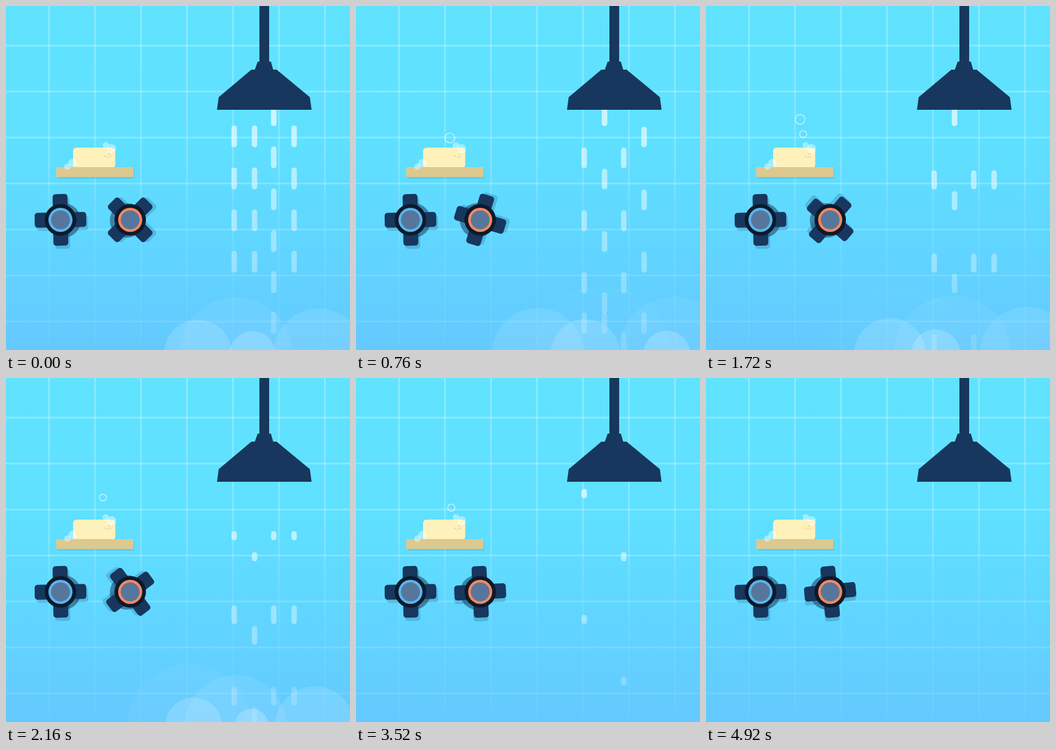
Recreate the animation shown at these times as an HTML page with a canvas. Size 600 by 600 pixels, loop 5.8 s.

```html
<!DOCTYPE html>
<html>
<head>
<meta charset="utf-8">
<style>
  html, body { margin: 0; width: 100%; height: 100%; overflow: hidden; background: #60e2ff; }
  canvas { display: block; }
</style>
</head>
<body>
<canvas id="stage" width="600" height="600"></canvas>
<script>
const ctx = document.getElementById('stage').getContext('2d');
const LOOP = 5800, STEP = 40;
const NAVY = '#17375e';

// The flow thins out in phases: from a given step on, one drop every `gap` steps.
const phases = [
  { from: -12, gap: 2 }, { from: 10, gap: 3 }, { from: 33, gap: 4 }, { from: 57, gap: 4 }, { from: 77, gap: 6 }
];
// Offset of each nozzle within the phases, and the step at which it runs dry.
const nozzles = [
  { x: 398, offsets: [1, 2, 0, 0, 4], dry: 101 },
  { x: 433.5, offsets: [1, 1, 3, 2], dry: 76 },
  { x: 467, offsets: [0, 2, 0, 2, 1], dry: 92 },
  { x: 502.5, offsets: [1, 0, 0, 1], dry: 66 }
];

const bubbles = [
  { from: 8, life: 42, r: 8.5, x: 164, sway: -1.5 },
  { from: 27, life: 37, r: 6, x: 170, sway: 1 },
  { from: 74, life: 48, r: 6.2, x: 169, sway: 10 }
];

const white = alpha => `rgba(255,255,255,${alpha})`;

function disc(x, y, r, color) {
  ctx.fillStyle = color;
  ctx.beginPath();
  ctx.arc(x, y, r, 0, 2 * Math.PI);
  ctx.fill();
}

function bar(x, y, w, h, r, color) {
  ctx.fillStyle = color;
  ctx.beginPath();
  ctx.roundRect(x, y, w, h, r);
  ctx.fill();
}

function polygon(color, ...points) {
  ctx.fillStyle = color;
  ctx.beginPath();
  for (let i = 0; i < points.length; i += 2) ctx.lineTo(points[i], points[i + 1]);
  ctx.fill();
}

function fade(...stops) {
  const gradient = ctx.createLinearGradient(0, 0, 0, 600);
  stops.forEach(([at, color]) => gradient.addColorStop(at, color));
  return gradient;
}

// Slow start and slower stop: the curve cubic-bezier(.25, 0, .6, 1).
function ease(time) {
  if (time <= 0 || time >= 1) return time <= 0 ? 0 : 1;
  let low = 0, high = 1, u;
  for (let i = 0; i < 20; i++) {
    u = (low + high) / 2;
    const x = 0.75 * u * (1 - u) ** 2 + 1.8 * u * u * (1 - u) + u ** 3;
    if (x < time) low = u; else high = u;
  }
  return u * u * (3 - 2 * u);
}

const wall = fade([0, '#60e3ff'], [0.4, '#5fe0ff'], [0.7, '#60d5ff'], [1, '#64c9ff']);
const columns = fade([0, white(0.27)], [0.45, white(0.22)], [0.6, white(0.1)], [1, white(0.03)]);
const rows = fade([0, white(0.29)], [0.5, white(0.23)], [1, white(0.08)]);

function drawWall() {
  ctx.fillStyle = wall;
  ctx.fillRect(0, 0, 600, 600);
  for (let i = 0; i < 7; i++) {
    ctx.fillStyle = columns;
    ctx.fillRect(73.5 + 80.2 * i, 0, 3, 600);
    ctx.fillStyle = rows;
    ctx.fillRect(0, 67.5 + 80.2 * i, 600, 3);
  }
}

// Puffs swell left, middle and right in turn, and thin out as they grow.
function drawSteam(n) {
  const life = 25;
  for (let k = 17; k >= 0; k--) {
    const age = n - (62 - 4.7 * k);
    if (age < 0 || age > life) continue;
    const x = [325, 550, 415][k % 3] + 15 * Math.sin(k);
    disc(x, 607, 24 + 4.2 * age, white(0.22 * (1 - age / life)));
  }
}

function emits({ offsets, dry }, step) {
  const i = phases.findLastIndex(phase => step >= phase.from);
  const { gap } = phases[i];
  return step < dry && (step + 2 * gap * gap) % gap === offsets[i];
}

function drawWater(n) {
  ctx.save();
  ctx.beginPath();
  ctx.rect(0, 181, 600, 419);
  ctx.clip();
  for (const nozzle of nozzles) {
    for (let age = 0; age < 12; age++) {
      const start = n - age;
      if (!emits(nozzle, start)) continue;
      const length = start < 51 ? 38 - 0.12 * Math.max(start, 0) : 16;
      const bottom = 209.5 + 36.8 * age - 0.006 * age ** 3;
      bar(nozzle.x - 4.8, bottom - length, 9.6, length, 4.6, white(0.68 - (bottom - 200) * 0.0013));
    }
  }
  ctx.restore();
}

function drawShower() {
  ctx.fillStyle = NAVY;
  ctx.fillRect(442, 0, 17, 98);
  polygon(NAVY, 439, 97, 462, 97, 466, 111, 472, 111, 530, 159, 533, 181,
    368, 181, 371, 159, 428, 111, 434, 111);
}

function drawSoap() {
  ctx.fillStyle = 'rgba(60,150,185,0.25)';
  ctx.fillRect(90, 284, 134, 17);
  bar(117, 247, 73.5, 36, 6, '#fff1bb');
  ctx.fillStyle = '#dcc990';
  ctx.fillRect(87.5, 281, 135, 17.5);
  for (const [x, y] of [[173, 262], [180, 258], [182, 262], [178, 264]]) {
    bar(x - 1.3, y - 0.8, 2.6, 1.6, 0.8, '#d5bd80');
  }
  for (const [x, y, r] of [[107, 280, 5.5], [116, 274, 7.5], [174, 243, 5.5], [184, 249, 8]]) {
    disc(x, y, r, white(0.42));
  }
}

function drawBubbles(n) {
  for (const { from, life, r, x, sway } of bubbles) {
    const age = n - from;
    if (age < 0 || age > life) continue;
    ctx.strokeStyle = white(0.72 * Math.min(1, (life + 1 - age) / 5));
    ctx.lineWidth = 1.4;
    ctx.beginPath();
    ctx.arc(x + sway * Math.cos(age / 7.6), 245 - 1.35 * age, r * Math.min(1, 0.4 + age / 8), 0, 2 * Math.PI);
    ctx.stroke();
  }
}

function drawArms(x, y, degrees, color) {
  ctx.save();
  ctx.translate(x, y);
  ctx.rotate(degrees * Math.PI / 180);
  ctx.fillStyle = color;
  ctx.beginPath();
  for (let i = 0; i < 4; i++) {
    ctx.roundRect(-13, -45, 26, 45, 5);
    ctx.rotate(Math.PI / 2);
  }
  ctx.fill();
  ctx.restore();
}

function drawTap(x, degrees, shadowDegrees, side, color) {
  const y = 373, dir = shadowDegrees * Math.PI / 180;
  drawArms(x + 6.5 * Math.cos(dir), y + 6.5 * Math.sin(dir), degrees, 'rgba(40,110,155,0.3)');
  disc(x + 5.5 * side, y + 1, 30, 'rgba(24,66,98,0.55)');
  drawArms(x, y, degrees, NAVY);
  disc(x, y, 27.5, '#0c1a2d');
  disc(x, y, 21, color);
  disc(x, y, 16.5, '#56779b');
}

function draw() {
  const n = Math.floor(performance.now() % LOOP / STEP);
  const turned = 411 * ease((n - 8.2) / 85);
  drawWall();
  drawSteam(n);
  drawWater(n);
  drawShower();
  drawSoap();
  drawBubbles(n);
  drawTap(95, -1, 60, 1, '#58b4ee');
  drawTap(216.6, 45 - turned, -0.65 * turned, -1, '#fc875e');
  requestAnimationFrame(draw);
}
draw();
</script>
</body>
</html>
```
